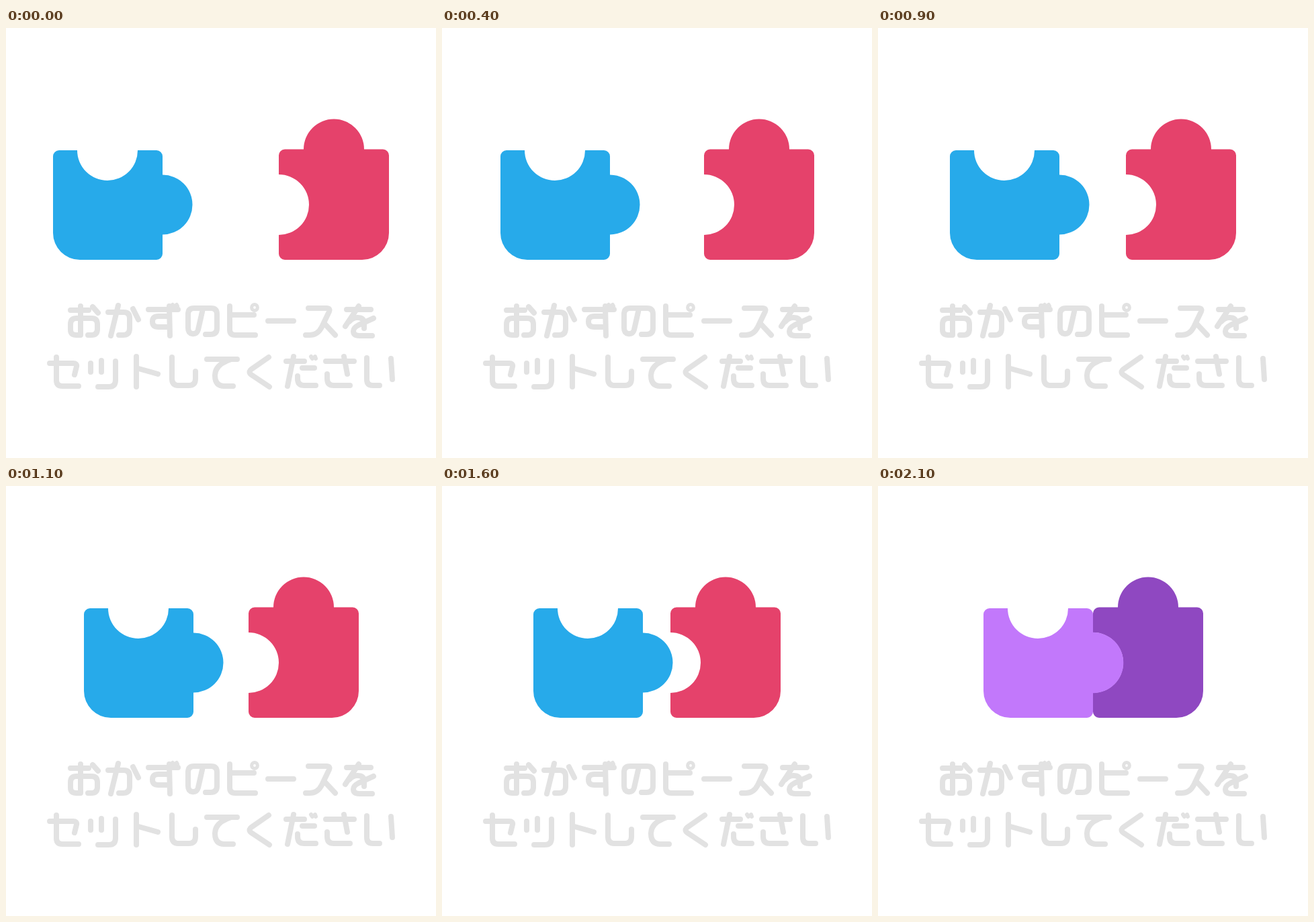
Write an HTML page that moves like this. It is 640 px wide and 640 px high and loops after 2600 ms.

```html
<!DOCTYPE html>
<html lang="ja">
<head>
<meta charset="utf-8">
<title>おかずのピースをセットしてください</title>
<style>
  html, body { margin: 0; width: 100%; height: 100%; overflow: hidden; background: #fff; }
  svg { display: block; width: 100vw; height: 100vh; }
  .lettering { fill: none; stroke: #e2e2e2; stroke-width: 8; stroke-linecap: round; stroke-linejoin: round; }
  .lettering .voicing { stroke-width: 6; }
</style>
</head>
<body>
<svg viewBox="0 0 640 640">
  <path id="right"/>
  <path id="left"/>
  <!-- Monoline rounded lettering, one path per character -->
  <g class="lettering" role="img" aria-label="おかずのピースをセットしてください">
    <path d="M96 420H123M111 414V457H105Q96 457 96 449V441Q96 432 105 432H127Q136 432 136 441V448Q136 457 127 457H122M129 415L137 424"/>
    <path d="M152 423H175Q184 423 184 432V447Q184 457 174 457H168M167 413L156 458M189 418L197 434"/>
    <path d="M212 419H256M243 414L244 458M243 429H227Q218 429 218 437T227 445H243"/>
    <path class="voicing" d="M248 412L250 414M254 412L255 414"/>
    <path d="M293 418L286 449Q284 456 277 455Q271 454 271 446V426Q271 417 280 417H305Q314 417 314 426V447Q314 456 304 456H297"/>
    <path d="M333 414V449Q333 457 341 457H371M335 427H369"/>
    <circle cx="370" cy="416" r="4.4" stroke-width="5"/>
    <path d="M390 436H428"/>
    <path d="M450 417H477Q483 417 481 422L470 445Q464 457 452 457H446M475 441L490 457"/>
    <path d="M507 419H543M525 414L505 444M511 437Q516 431 523 431Q533 431 533 440V447M547 432L525 442Q517 446 517 451Q517 458 526 458H545"/>
    <path d="M65 499H100Q106 499 105 504L102 516M75 490V524Q75 533 84 533H108"/>
    <path d="M126 499V512M142 495V512M163 496V524Q163 534 153 534H137"/>
    <path d="M194 489V534M194 506L226 515"/>
    <path d="M247 490V522Q247 532 257 532H272Q282 532 282 522V511"/>
    <path d="M299 493H344M335 493Q311 501 311 517Q311 533 325 533H338"/>
    <path d="M391 490L365 508Q360 512 365 516L392 534"/>
    <path d="M417 496H444M428 489L419 533M441 506H459M434 518V522Q434 532 444 532H461"/>
    <path class="voicing" d="M454 489L456 492M460 489L461 492"/>
    <path d="M476 496H518M503 489L508 515M478 515V522Q478 532 488 532H512"/>
    <path d="M537 491V523Q537 532 546 532H556M573 492L575 523"/>
  </g>
</svg>
<script>
const LOOP = 2600, STEP = 100, STEPS = 21;
const left = document.getElementById('left');
const right = document.getElementById('right');

const leftShape = tab =>
  `M9 182H36A45 45 0 0 0 126 182H154A9 9 0 0 1 163 191V${263 - tab}` +
  `A${tab} ${tab} 0 0 1 163 ${263 + tab}V336A9 9 0 0 1 154 345` +
  'H40A40 40 0 0 1 0 305V191A9 9 0 0 1 9 182Z';

const rightShape =
  'M9 180.5H37A45 45 0 0 1 127 180.5H155A9 9 0 0 1 164 189.5V305' +
  'A40 40 0 0 1 124 345H9A9 9 0 0 1 0 336V308A45 45 0 0 0 0 218V189.5A9 9 0 0 1 9 180.5Z';

function place(piece, x, color) {
  piece.setAttribute('transform', `translate(${x} 0)`);
  piece.setAttribute('fill', color);
}

function render(time) {
  const step = Math.min(STEPS, Math.floor(time % LOOP / STEP));
  const joined = step === STEPS;
  const slide = (from, to) => Math.round(from + (to - from) * step / STEPS);
  left.setAttribute('d', leftShape(joined ? 45.3 : 44.5));
  place(left, slide(70, 157), joined ? '#c278fb' : '#27aaea');
  place(right, slide(406, 320), joined ? '#8f48c1' : '#e5426b');
}

right.setAttribute('d', rightShape);
const start = performance.now();
function tick() {
  render(performance.now() - start);
  requestAnimationFrame(tick);
}
tick();
</script>
</body>
</html>
```
